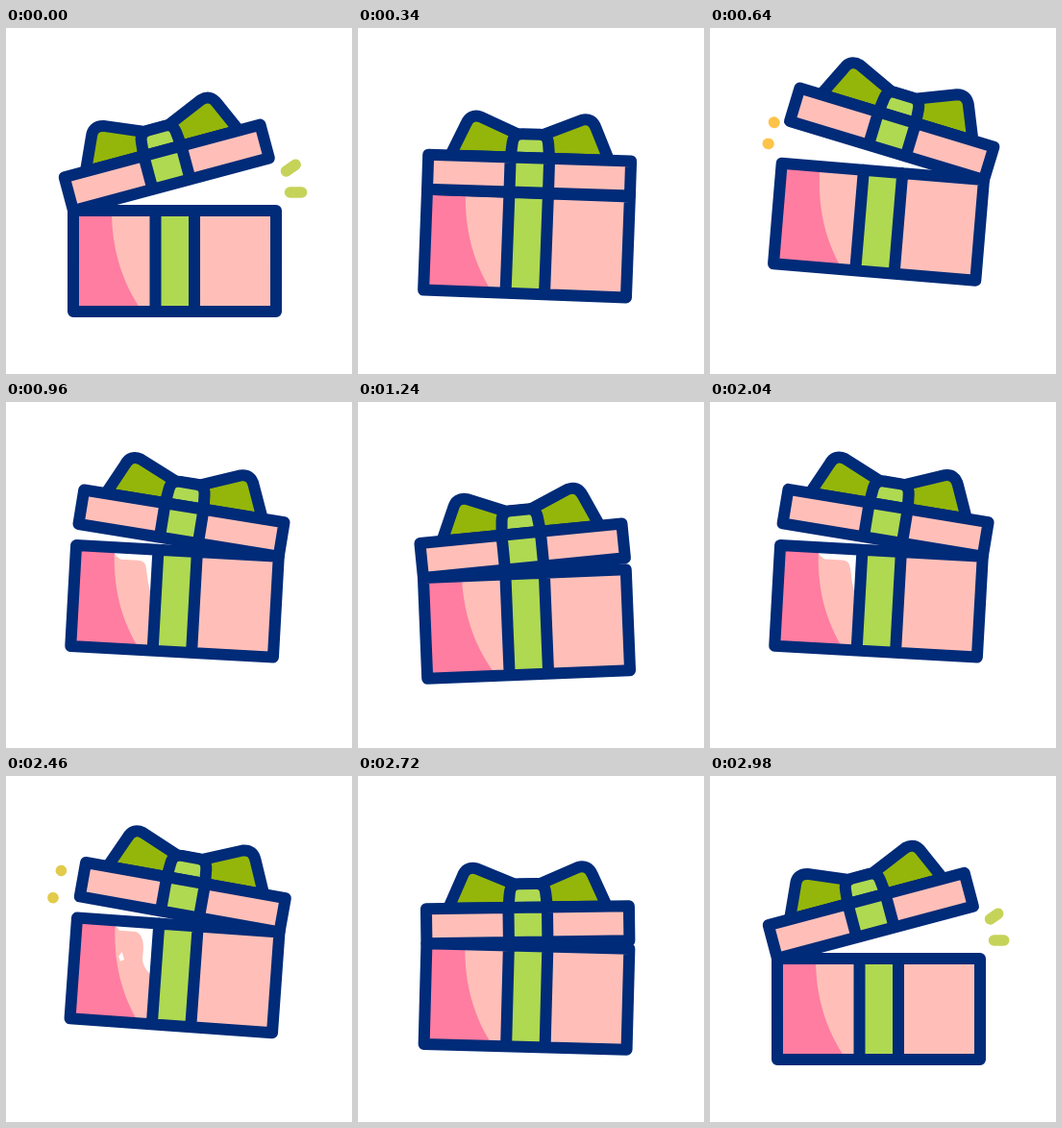
Write an HTML page that moves like this. It is 360 px wide and 360 px high and loops after 3 s.

```html
<!DOCTYPE html>
<html lang="en">
<head>
<meta charset="utf-8">
<title>Gift box</title>
<style>
  html, body { margin: 0; width: 100%; height: 100%; overflow: hidden; background: #fff; }
  svg { display: block; width: 100vw; height: 100vh; }
  .line { fill: none; stroke: #002b78; stroke-width: 12; stroke-linecap: round; stroke-linejoin: round; }
  .pink { fill: #ffbfb8; }
  .rose { fill: #ff7da0; }
  .lime { fill: #afd951; }
  .leaf { fill: #94b60a; }
  .spark { stroke-width: 11.5; stroke-linecap: round; }
</style>
</head>
<body>
<svg viewBox="0 0 360 360">
  <g id="gift">
    <rect class="pink" x="70" y="190" width="211" height="105"/>
    <g id="glints" fill="#fff">
      <path d="M109 194H151V237C146 225 146 218 144 210Q143 202 135.6 202H117Q112 200 109 194Z"/>
      <path d="M109 194H151V244C144 238 140 232 141 224C142 212 139 200 130 200H115ZM116 227l3-5 3 8-4 2Z"/>
    </g>
    <path class="rose" d="M70 190H110C110 232 122 267 142 295H70Z"/>
    <rect class="lime" x="155.5" y="190" width="40.5" height="105"/>
    <path class="line" d="M70 190H281V295H70ZM155.5 190V295M196 190V295"/>
    <g id="lid">
      <g id="bow">
        <path class="leaf line" style="fill:#94b60a" d="M93 154L108 121Q112 110 123 113L163 130H188L228.5 113Q239 110 243.5 121L258 154Z"/>
      </g>
      <path class="lime line" style="fill:#afd951" d="M155.5 154L157 139Q158 129.5 167 129.5H185Q193.500 129.500 194.500 139L196 154Z"/>
      <rect class="pink" x="70" y="154" width="211" height="36"/>
      <rect class="lime" x="155.5" y="154" width="40.5" height="36"/>
      <path class="line" d="M70 154H281V190H70ZM155.5 154V190M196 154V190"/>
    </g>
    <g id="sparks">
      <line class="spark"/>
      <line class="spark"/>
    </g>
  </g>
</svg>
<script>
const LOOP = 3000, SWING = 1500;
const CX = 175.5, CY = 242.5;
const byId = id => document.getElementById(id);
const gift = byId('gift'), lid = byId('lid'), sparks = byId('sparks');
const glints = byId('glints').children;

const TRACKS = [[291.5, 149, 301.5, 142], [295.5, 171, 308, 171]];

// Each burst runs from start to end; spread is how far the tail lags the head.
const BURSTS = [
  { start: -130, end: 140, spread: 0.5, right: false, color: '#c6d359' },
  { start: 610, end: 870, spread: 0.06, right: true, color: '#ffc34a' },
  { start: 1435, end: 1680, spread: 0.06, right: false, color: '#bfcb58' },
  { start: 2220, end: 2475, spread: 0.02, right: true, color: '#e2cb4a' },
  { start: 2870, end: 3140, spread: 0.5, right: false, color: '#c6d359' }
];

const clamp = v => Math.max(0, Math.min(1, v));
const mix = (a, b, k) => a + (b - a) * k;

function drawSparks(t) {
  const burst = BURSTS.find(b => t >= b.start && t <= b.end);
  sparks.style.display = burst ? '' : 'none';
  if (!burst) return;
  const k = (t - burst.start) / (burst.end - burst.start);
  const head = clamp(k / (1 - burst.spread));
  const tail = clamp((k - burst.spread) / (1 - burst.spread));
  sparks.setAttribute('stroke', burst.color);
  sparks.setAttribute('transform', burst.right ? `translate(${2 * CX} 0) scale(-1 1)` : '');
  TRACKS.forEach(([x1, y1, x2, y2], i) => {
    const line = sparks.children[i];
    line.setAttribute('x1', mix(x1, x2, tail));
    line.setAttribute('y1', mix(y1, y2, tail));
    line.setAttribute('x2', mix(x1, x2, head) + 0.01);
    line.setAttribute('y2', mix(y1, y2, head));
  });
}

function draw(t) {
  // swing: -1 is open to the left on the ground, 1 is open to the right in the air
  const swing = -Math.cos(2 * Math.PI * t / SWING);
  const resting = t < SWING / 2 || t > LOOP - SWING / 2;
  const tilt = resting ? 2.5 + 2.5 * swing : 5 * swing;
  const lift = -21.5 * (1 + swing);
  gift.setAttribute('transform', `translate(0 ${lift}) rotate(${tilt} ${CX} ${CY})`);

  const hinge = swing < 0 ? 70 : 281;
  lid.setAttribute('transform', `rotate(${15 * swing * Math.abs(swing)} ${hinge} 190)`);

  const glinting = swing > 0.3 && swing < 0.78;
  const late = t > 2250;
  glints[0].style.display = glinting && !late ? '' : 'none';
  glints[1].style.display = glinting && late ? '' : 'none';

  drawSparks(t);
}

const origin = performance.now();
function tick() {
  draw((performance.now() - origin) % LOOP);
  requestAnimationFrame(tick);
}
draw(0);
requestAnimationFrame(tick);
</script>
</body>
</html>
```
